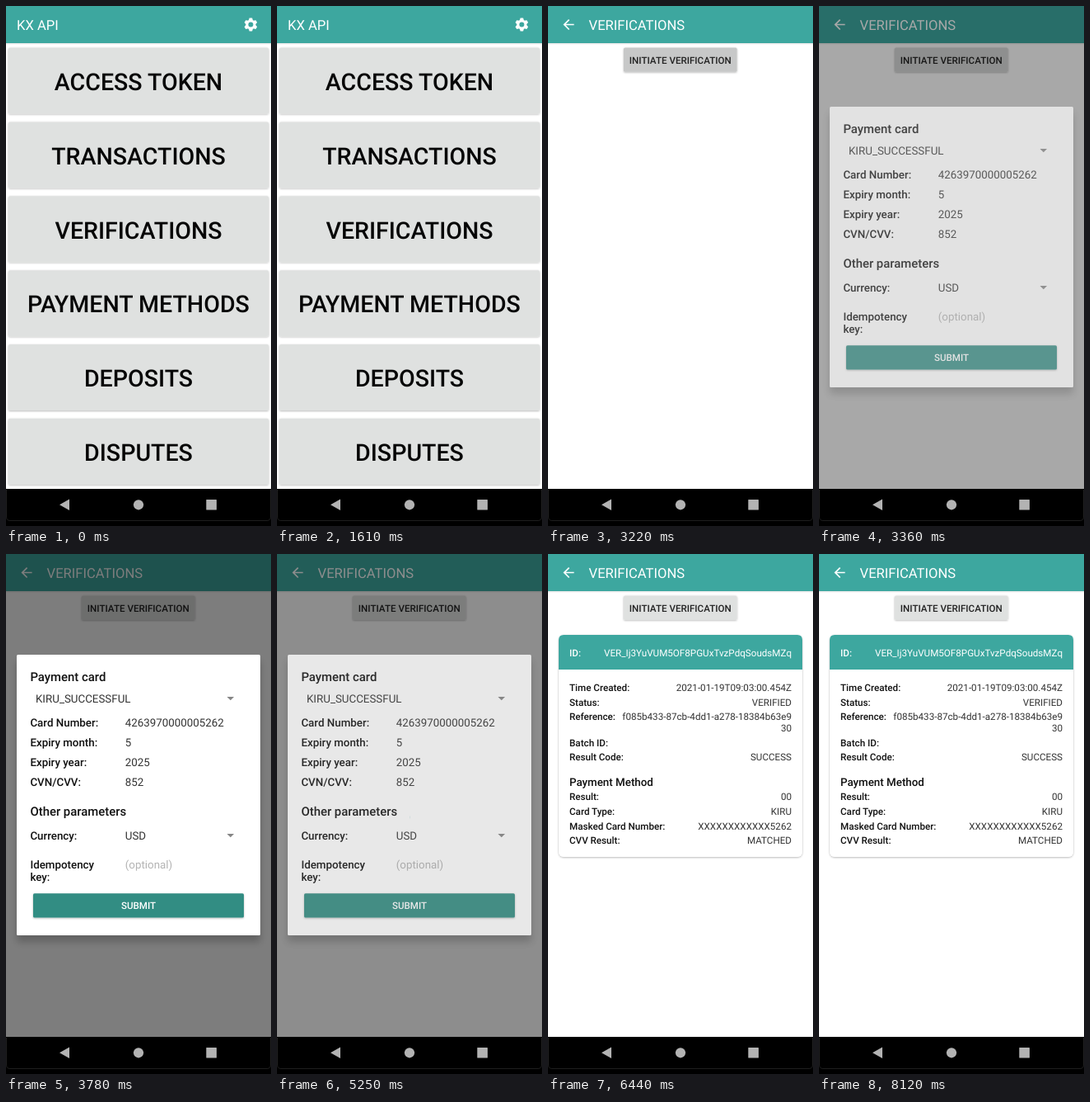
These frames come from a looping animation (322x630 px, 8.61 s). An HTML page:

```html
<!DOCTYPE html>
<html lang="en">
<head>
<meta charset="utf-8">
<title>Payments demo</title>
<style>
  html, body { margin: 0; width: 100%; height: 100%; overflow: hidden; background: #fff; }
  svg { display: block; width: 100vw; height: 100vh; }
  text { font-family: Roboto, sans-serif; text-rendering: geometricPrecision; white-space: pre; }
</style>
</head>
<body>
<svg id="stage" viewBox="0 0 322 630">
  <defs>
    <filter id="low" x="-5%" y="-20%" width="110%" height="150%">
      <feDropShadow dx="0" dy="0.8" stdDeviation="0.8" flood-opacity="0.3"/>
    </filter>
    <filter id="high" x="-10%" y="-10%" width="120%" height="125%">
      <feDropShadow dx="0" dy="8" stdDeviation="5" flood-opacity="0.22"/>
    </filter>
  </defs>
  <rect width="322" height="630" fill="#fff"/>
  <rect y="45" width="322" height="1.5" fill="#000" opacity="0.08"/>
  <rect width="322" height="45" fill="#3da79f"/>
  <g id="menu"></g>
  <g id="page">
    <rect y="47" width="322" height="538" fill="#fff"/>
    <path transform="translate(15.2 12.7) scale(.82)" fill="#fff"
      d="M20 11H7.83l5.59-5.59L12 4l-8 8 8 8 1.41-1.41L7.83 13H20z"/>
  </g>
  <path id="spinner" fill="none" stroke="#3da79f" stroke-width="3"/>
  <g id="result"></g>
  <rect id="dim" width="322" height="585" fill="#000"/>
  <g id="dialog"></g>
  <rect y="585" width="322" height="45" fill="#000"/>
  <path d="M.5 586V619Q.5 623.5 5 623.5H317Q321.5 623.5 321.5 619V586" fill="none" stroke="#1e1e1e"/>
  <g fill="#b3b3b3">
    <path d="M65 604.3L77 597.5V611z"/>
    <circle cx="161" cy="604.3" r="6.1"/>
    <rect x="243.3" y="598" width="12.6" height="12.6" rx="0.6"/>
  </g>
</svg>
<script>
const LOOP = 8610, STEP = 70;
const TEAL = '#3da79f', GREY = '#dfe1e0', INK = '#111', SOFT = '#333';
const $ = id => document.getElementById(id);

function add(parent, tag, attrs, content) {
  const el = document.createElementNS('http://www.w3.org/2000/svg', tag);
  for (const key in attrs) el.setAttribute(key, attrs[key]);
  if (content) el.textContent = content;
  return parent.appendChild(el);
}
const box = (parent, x, y, width, height, fill, more) =>
  add(parent, 'rect', { x, y, width, height, fill, rx: 1.6, ...more });
const label = (parent, text, x, y, size, fill = INK, weight = 500, anchor = 'start') =>
  add(parent, 'text', { x, y, fill, 'font-size': size, 'font-weight': weight, 'text-anchor': anchor }, text);

const menu = $('menu'), page = $('page'), dialog = $('dialog'), result = $('result');

function buildMenu() {
  label(menu, 'KX API', 13, 28.8, 16.6, '#fff', 400);
  const gear = add(menu, 'g', { transform: 'translate(297.4 22.6)', fill: '#fff' });
  add(gear, 'circle', { r: 4.5, fill: 'none', stroke: '#fff', 'stroke-width': 3 });
  for (let a = 0; a < 360; a += 60)
    add(gear, 'path', { d: 'M-2.6-5L-1.7-8H1.7L2.6-5z', transform: `rotate(${a})` });

  let pressed;
  ['ACCESS TOKEN', 'TRANSACTIONS', 'VERIFICATIONS', 'PAYMENT METHODS', 'DEPOSITS', 'DISPUTES'].forEach((name, i) => {
    const y = 50.6 + i * 89.85;
    box(menu, 3, y, 316, 80, GREY, { filter: 'url(#low)' });
    if (i === 2) pressed = box(menu, 3, y, 316, 80, '#000');
    label(menu, name, 161, y + 51.2, 28.6, '#060606', 500, 'middle');
  });
  return pressed;
}

function buildPage() {
  label(page, 'VERIFICATIONS', 49.6, 28.8, 16.6, '#fff', 400);
  box(page, 92, 50.6, 137.6, 29.2, GREY, { filter: 'url(#low)' });
  const pressed = box(page, 92, 50.6, 137.6, 29.2, '#000');
  label(page, 'INITIATE VERIFICATION', 160.8, 70, 11.6, '#222', 500, 'middle');
  return pressed;
}

function buildDialog() {
  box(dialog, 13, 122, 296, 340, '#fff', { filter: 'url(#high)' });
  label(dialog, 'Payment card', 29.4, 154.2, 14.9);
  label(dialog, 'KIRU_SUCCESSFUL', 36, 179.7, 13.35, SOFT, 400);
  label(dialog, 'Other parameters', 29.4, 316.6, 14.9);
  [['Card Number:', '4263970000005262', 208.6], ['Expiry month:', '5', 232.7],
   ['Expiry year:', '2025', 256.8], ['CVN/CVV:', '852', 280.9],
   ['Currency:', 'USD', 345.6], ['Idempotency', '', 381.2], ['key:', '', 396.4]
  ].forEach(([name, value, y]) => {
    label(dialog, name, 29.4, y, 13.35);
    label(dialog, value, 144.8, y, 13.35, SOFT, 400);
  });
  label(dialog, '(optional)', 144.8, 381.2, 13.35, '#b4b4b4', 400);
  for (const y of [173, 339])
    add(dialog, 'path', { d: `M268.5 ${y}h8.6l-4.3 4.2z`, fill: '#858585' });
  box(dialog, 33, 411.2, 256, 29.4, '#338d83', { filter: 'url(#low)' });
  label(dialog, 'SUBMIT', 161, 430.4, 11.6, '#fff', 500, 'middle');
}

function buildResult() {
  box(result, 13, 98, 296, 269, '#fff', { rx: 6, filter: 'url(#low)' });
  add(result, 'path', { d: 'M13 140V104Q13 98 19 98H303Q309 98 309 104V140z', fill: TEAL });
  label(result, 'ID:', 26, 123.5, 11.65, '#fff');
  label(result, 'VER_Ij3YuVUM5OF8PGUxTvzPdqSoudsMZq', 296, 123.5, 11.65, '#fff', 400, 'end');
  label(result, 'Payment Method', 26, 280.6, 13.35);
  [['Time Created:', '2021-01-19T09:03:00.454Z', 166], ['Status:', 'VERIFIED', 183.6],
   ['Reference:', 'f085b433-87cb-4dd1-a278-18384b63e9', 201.1], ['', '30', 215],
   ['Batch ID:', '', 232.6], ['Result Code:', 'SUCCESS', 250.2],
   ['Result:', '00', 298.4], ['Card Type:', 'KIRU', 316],
   ['Masked Card Number:', 'XXXXXXXXXXXX5262', 333.6], ['CVV Result:', 'MATCHED', 351.2]
  ].forEach(([name, value, y]) => {
    label(result, name, 26, y, 11.65);
    label(result, value, 296, y, 11.65, SOFT, 400, 'end');
  });
}

const menuPress = buildMenu(), pagePress = buildPage();
buildDialog();
buildResult();

const ramp = (t, from, to) => Math.min(1, Math.max(0, (t - from) / (to - from)));
const show = (el, opacity) => el.setAttribute('opacity', opacity);

// Cubic bezier easing (.2, 0, .1, 1)
function ease(x) {
  let lo = 0, hi = 1;
  for (let i = 0; i < 24; i++) {
    const s = (lo + hi) / 2, r = 1 - s;
    if (.6 * r * r * s + .3 * r * s * s + s * s * s < x) lo = s; else hi = s;
  }
  return lo * lo * (3 - 2 * lo);
}

// Indeterminate ring: the head runs ahead, then the tail catches up
function arc(e) {
  const half = 666.5, turn = e % (2 * half);
  const base = -90 + e * (90 / (2 * half) + 720 / 4444);
  const tail = base + 270 * ease(ramp(turn, half, 2 * half));
  const head = Math.max(base + 270 * ease(ramp(turn, 0, half)), tail + 4);
  const point = deg => {
    const a = deg * Math.PI / 180;
    return `${161 + 15 * Math.cos(a)} ${334 + 15 * Math.sin(a)}`;
  };
  return `M${point(tail)}A15 15 0 ${head - tail > 180 ? 1 : 0} 1 ${point(head)}`;
}

function update(t) {
  const opened = ramp(t, 1680, 1960);
  show(menu, 1 - opened);
  show(page, opened);
  show(menuPress, .11 * ramp(t, 1610, 1750));
  show(pagePress, .11 * ramp(t, 2940, 3150) * (1 - ramp(t, 3220, 3430)));

  const shown = ramp(t, 3220, 3430);
  show(dialog, shown * (1 - ramp(t, 5215, 5390)));
  show(dim, .51 * shown * (t < 5320 ? 1 - .12 * ramp(t, 5180, 5250) : 1 - ramp(t, 5215, 5390)));

  const spinning = t >= 5250 && t < 6160;
  show(spinner, spinning ? 1 : 0);
  if (spinning) spinner.setAttribute('d', arc(Math.max(0, t - 5258)));
  show(result, t >= 6160 ? 1 : 0);
}

const dim = $('dim'), spinner = $('spinner');
const begin = performance.now();
function tick() {
  const t = (performance.now() - begin) % LOOP;
  update(Math.floor(t / STEP) * STEP);
  requestAnimationFrame(tick);
}
tick();
</script>
</body>
</html>
```
